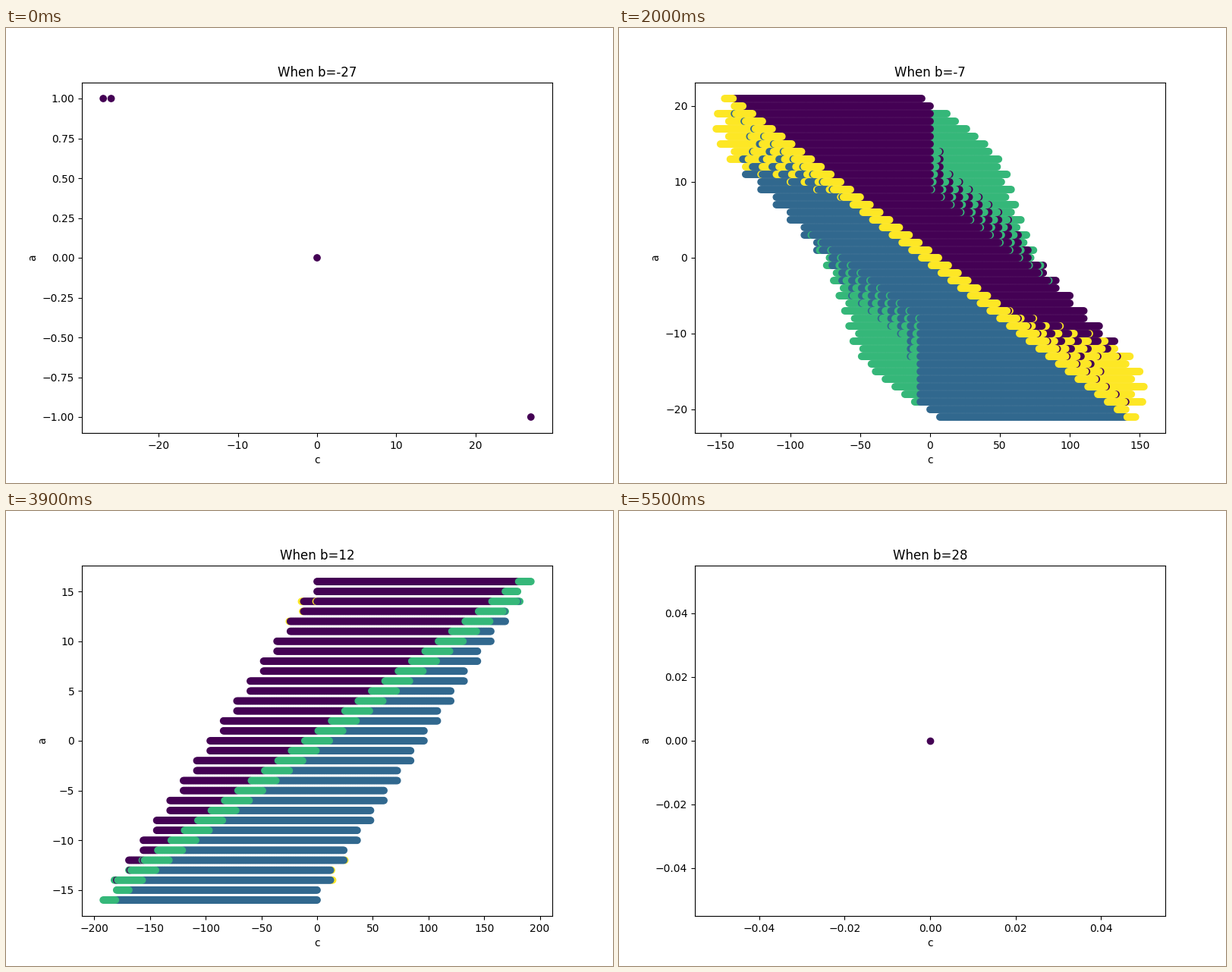
Animation of 800x600 px, one loop 5600 ms. Source, as a matplotlib script:

```python
import matplotlib.pyplot as plt
import numpy as np
from matplotlib.animation import FuncAnimation

# Slices of a word-metric ball in the discrete Heisenberg group.
# Colour is the last letter of the first word that reaches an element.
SIZE = 260_000
STEPS = ((1, 0), (-1, 0), (0, 1), (0, -1))
B_VALUES = range(-27, 29)


def grow_ball(size):
    """Breadth-first list of (a, b, c) and the letter that reached each."""
    start = (0, 0, 0)
    seen = {start}
    elements, letters = [start], [0]
    for a, b, c in elements:
        for letter, (da, db) in enumerate(STEPS):
            new = (a + da, b + db, c + a * db)
            if new in seen:
                continue
            seen.add(new)
            elements.append(new)
            letters.append(letter)
            if len(elements) == size:
                return np.array(elements), np.array(letters)


elements, letters = grow_ball(SIZE)
# Short words are painted last, on top of the long ones.
elements, letters = elements[::-1], letters[::-1]

fig, ax = plt.subplots(figsize=(8, 6), dpi=100)


def draw(i):
    b = B_VALUES[i]
    rows = elements[:, 1] == b
    a, c = elements[rows, 0], elements[rows, 2]
    ax.clear()
    ax.scatter(c, a, c=letters[rows])
    ax.set_title(f"When b={b}")
    ax.set_xlabel("c")
    ax.set_ylabel("a")
    return []


anim = FuncAnimation(fig, draw, frames=len(B_VALUES), interval=100,
                     init_func=lambda: [], repeat=True, repeat_delay=0)
plt.show()
```
